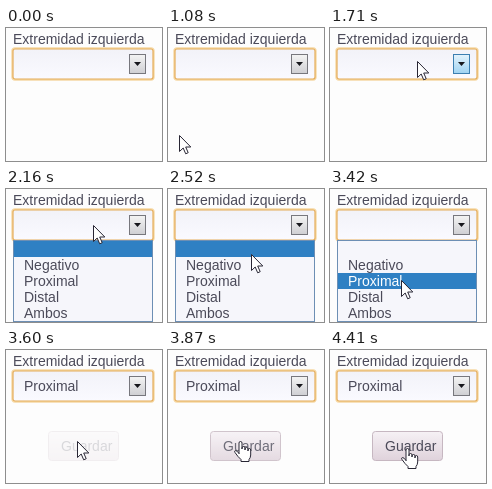
An HTML page that plays this animation: 156x133 px, repeating every 4500 ms.

```html
<!DOCTYPE html>
<html lang="es">
<head>
<meta charset="utf-8">
<style>
html, body { margin: 0; width: 100%; height: 100%; overflow: hidden; background: #fdfdfd; }
svg { display: block; width: 100%; height: 100%; }
text { font: 14px "Liberation Sans", Arial, sans-serif; fill: #4b4a59; }
.pointer { fill: #fff; stroke: #282634; stroke-linejoin: round; }
</style>
</head>
<body>
<svg viewBox="0 0 156 133">
  <defs>
    <linearGradient id="field" x2="0" y2="1">
      <stop stop-color="#f2f2f8"/><stop offset="1" stop-color="#fafaff"/>
    </linearGradient>
    <linearGradient id="grey" x2="0" y2="1">
      <stop stop-color="#f4f4f4"/><stop offset="1" stop-color="#cfcfd3"/>
    </linearGradient>
    <linearGradient id="blue" x2="0" y2="1">
      <stop stop-color="#e4f3fc"/><stop offset="1" stop-color="#9fd3f2"/>
    </linearGradient>
    <linearGradient id="button" x2="0" y2="1">
      <stop stop-color="#f6f1f5"/><stop offset="1" stop-color="#dfd2db"/>
    </linearGradient>
  </defs>
  <text x="7" y="16">Extremidad izquierda</text>
  <rect x="6.5" y="20.5" width="141" height="31" rx="2.5" fill="none" stroke="#f6d9a6" stroke-width="2.4"/>
  <rect x="7" y="21" width="140" height="30" rx="2" fill="url(#field)" stroke="#e5ad5b" stroke-width="1.2"/>
  <text id="value" x="18" y="41">Proximal</text>
  <rect id="drop" x="123.5" y="26.5" width="16" height="19"/>
  <path d="M128 34h7l-3.5 4z" fill="#17171c"/>
  <g id="list">
    <rect x="7.5" y="51.5" width="139" height="81" fill="#f6f6fb" stroke="#6d8fb4"/>
    <rect id="mark" x="8" width="138" height="16" fill="#2f80c3"/>
  </g>
  <g id="save">
    <rect x="42.5" y="81.5" width="70" height="29" rx="3" fill="url(#button)" stroke="#c6b7c1"/>
    <text x="55" y="101">Guardar</text>
  </g>
  <path id="arrow" class="pointer" d="M.5 .5V16.5L4.2 13L6.7 18.8L9.2 17.7L6.7 12H11.8Z"/>
  <path id="hand" class="pointer" d="M5 13V2Q5 .5 6.5 .5T8 2V8V7Q8 5.5 9.5 5.5T11 7V9V8Q11 6.5 12.5 6.5T14 8V10V9Q14.2 7.5 15.4 7.5T16.7 9V14Q16.5 17 15 18.5V20.5H7V18.5Q4 16 1 11.5Q0 9.7 1.5 9.5Q3 9.5 5 12.5"/>
</svg>
<script>
const LOOP = 4500, STEP = 90, TOP = 52, ROW = 16;
const OPEN = 1890, CLOSE = 3510;
const $ = id => document.getElementById(id);
const set = (id, name, value) => $(id).setAttribute(name, value);
const show = (id, on) => set(id, 'visibility', on ? 'visible' : 'hidden');
const clamp = v => Math.max(0, Math.min(1, v));

// Pointer stops: time, x, y
const stops = [
  [1080, 11, 107], [1530, 79, 41], [1710, 87, 33], [2070, 87, 33],
  [2520, 83, 65], [2700, 83, 65], [3240, 71, 91], [3600, 71, 91],
  [3870, 72, 91], [4230, 77, 98], [LOOP, 77, 98]
];

const labels = ['', 'Negativo', 'Proximal', 'Distal', 'Ambos'].map((name, i) => {
  const label = document.createElementNS('http://www.w3.org/2000/svg', 'text');
  label.textContent = name;
  label.setAttribute('x', 18);
  label.setAttribute('y', TOP + ROW * i + 13);
  return $('list').appendChild(label);
});

function pointerAt(t) {
  const i = Math.max(1, stops.findIndex(s => s[0] > t));
  const [t0, x0, y0] = stops[i - 1], [t1, x1, y1] = stops[i];
  const p = clamp((t - t0) / (t1 - t0)), e = p * p * (3 - 2 * p);
  return [x0 + (x1 - x0) * e, y0 + (y1 - y0) * e];
}

function draw(now) {
  const t = Math.floor(now % LOOP / STEP) * STEP;
  const [x, y] = pointerAt(t).map(Math.round);
  const open = t >= OPEN && t < CLOSE, chosen = t >= CLOSE;
  const hover = t >= 1530 && t < OPEN;
  const row = Math.max(0, Math.floor((y - TOP) / ROW));

  show('arrow', t >= 1080 && t < 3690);
  show('hand', t >= 3690);
  set('arrow', 'transform', `translate(${x} ${y})`);
  set('hand', 'transform', `translate(${x - 6} ${y})`);

  set('drop', 'fill', `url(#${hover ? 'blue' : 'grey'})`);
  set('drop', 'stroke', hover ? '#3c7fb1' : '#77777d');
  show('value', chosen);
  show('list', open);
  set('mark', 'y', TOP + ROW * row);
  labels.forEach((label, i) => label.style.fill = i === row ? '#fff' : '');
  set('save', 'opacity', clamp((t - 3510) / 450));

  requestAnimationFrame(draw);
}
requestAnimationFrame(draw);
</script>
</body>
</html>
```
